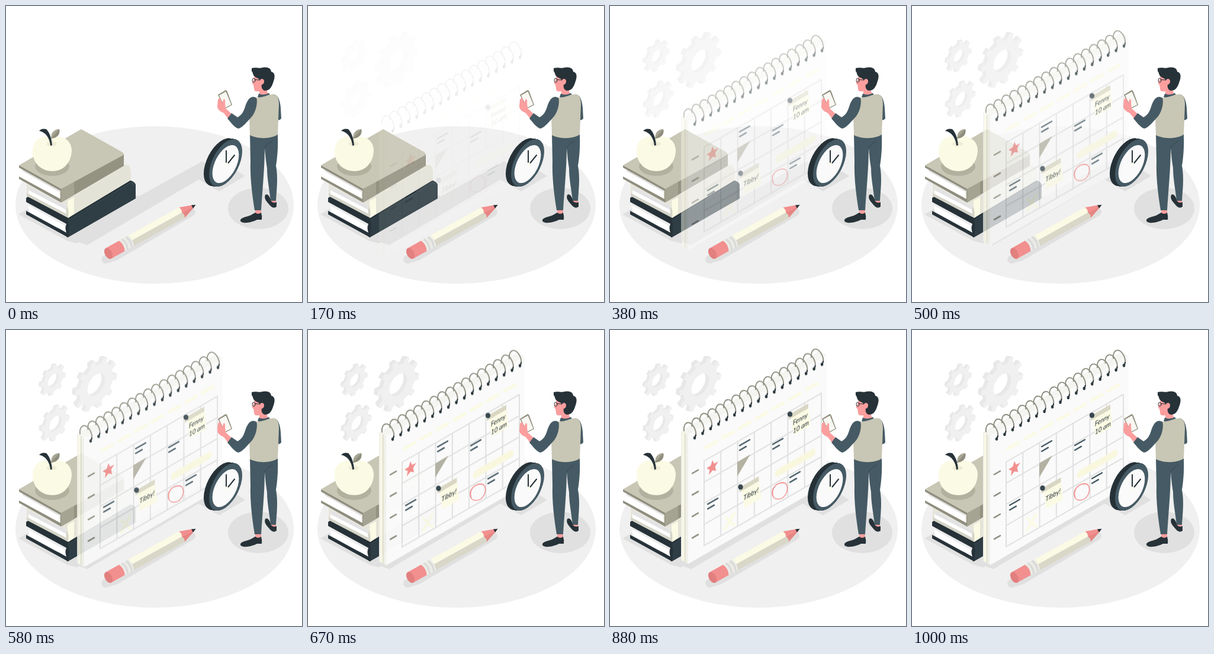
An HTML page with a canvas for the animation above (1.04 s loop, 500 by 500 pixels).

```html
<!DOCTYPE html>
<html lang="en">
<head>
<meta charset="utf-8">
<title>Planning with a calendar</title>
<style>
html, body { margin: 0; width: 100%; height: 100%; overflow: hidden; background: #fff; }
canvas { display: block; width: 500px; height: 500px; }
</style>
</head>
<body>
<canvas id="stage"></canvas>
<script>
const SIZE = 500, LOOP = 1040, STEP = 1000 / 24;
const DPR = Math.max(1, window.devicePixelRatio || 1);
const NAVY = '#263238', SLATE = '#455a64', CREAM = '#fbfae4', TAUPE = '#c8c6b4';
const PINK = '#f28f8f', SKIN = '#fb9e9e', SHADOW = '#e0e0e0';
const ISO = Math.tan(Math.PI / 6);

const stage = document.getElementById('stage');
stage.width = stage.height = SIZE * DPR;
const out = stage.getContext('2d');
let c;

function layer(draw) {
  const cv = document.createElement('canvas');
  cv.width = cv.height = SIZE * DPR;
  c = cv.getContext('2d');
  c.scale(DPR, DPR);
  c.lineCap = c.lineJoin = 'round';
  draw();
  return cv;
}

function fill(d, color) {
  c.fillStyle = color;
  c.fill(new Path2D(d));
}

function line(d, color, width) {
  c.strokeStyle = color;
  c.lineWidth = width;
  c.stroke(new Path2D(d));
}

function oval(x, y, rx, ry, color, turn = 0) {
  c.fillStyle = color;
  c.beginPath();
  c.ellipse(x, y, rx, ry, turn, 0, 7);
  c.fill();
}

// Draw in the upright plane that rises to the right
function onPlane(x, y, draw, kx = .866, ky = -.5) {
  c.save();
  c.transform(kx, ky, 0, 1, x, y);
  draw();
  c.restore();
}

function floor() {
  oval(251, 336, 235, 133, '#f0f0f0');
  fill('M21 352L90 312L221 320L232 326L120 401L104 397Z', SHADOW);
  fill('M107 391L220 324L332 262L352 278L324 294L137 404L116 396Z', SHADOW);
  fill('M325 293L358 275L380 272L404 287L360 313Z', SHADOW);
  oval(426, 342, 51, 35, SHADOW);
}

function books() {
  // bottom
  fill('M34 324L110 282L204 294Q215 294 219 301V325L104 391Z', NAVY);
  fill('M104 362L211 297Q217 297 219 303L118 361Z', '#37474f');
  fill('M104 363L211 299L219 305V325L104 391Z', '#2f3d44');
  fill('M38 332L102 367Q99 374 102 383L38 347Z', '#fff');
  fill('M38 332L102 367L101 372L38 337Z', '#ebebeb');
  fill('M34 324L104 362Q108 364 105 391L34 352V346L102 383V368L34 331Z', NAVY);
  // middle
  fill('M35 300L110 262L202 268Q210 271 211 281V294L105 357L35 321Z', '#e6e5da');
  fill('M104 329L206 268Q211 273 211 282V294L105 358Z', '#e4e3d7');
  fill('M104 329L115 323V351L105 358Z', CREAM);
  fill('M38 304L102 337Q99 345 103 354L38 319Z', '#fff');
  fill('M38 304L102 337L101 344L38 311Z', '#e3e3e3');
  fill('M35 316L102 351V339Q107 343 105 358L35 321Z', '#d5d4c8');
  // top
  fill('M93 308L199 250V270L93 332Z', '#949281');
  fill('M93 308L115 296V319L93 332Z', '#a5a392');
  fill('M28 273L92 308Q88 316 92 328L28 292Z', '#fff');
  fill('M28 273L92 308L90 314L28 279Z', '#e0e0e0');
  fill('M22 288L92 326V312L22 273V269L93 307V332L22 292Z', '#8f8d7d');
  fill('M22 269L127 208L195 246Q200 249 198 252L93 309Z', TAUPE);
}

function apple() {
  oval(78, 271, 29, 16, '#b2b09f');
  fill('M77 223C90 217 110 223 111 243C111 264 97 279 79 279C60 279 45 266 45 245C45 222 65 217 77 223Z', CREAM);
  oval(77, 233, 9, 4, '#efedd6');
  fill('M75 236C74 223 67 213 56 211Q60 206 68 208C74 214 77 224 78 235Z', NAVY);
  fill('M76 224C76 213 82 208 90 208C92 216 87 223 76 224Z', '#a7a594');
  fill('M76 224L90 208C92 216 87 223 76 224Z', '#8f8d7d');
}

function gear(x, y, r, teeth, depth) {
  const path = new Path2D();
  const edge = [[-.43, .79], [-.24, .8], [-.17, 1], [.17, 1], [.24, .8]];
  for (let i = 0; i < teeth; i++) {
    for (const [off, k] of edge) {
      const a = (i + off) / teeth * Math.PI * 2 + .15;
      path.lineTo(Math.cos(a) * r * k, Math.sin(a) * r * k);
    }
  }
  path.closePath();
  path.moveTo(r * .42, 0);
  path.arc(0, 0, r * .42, 0, 7);
  for (let d = depth; d >= 0; d -= .5) {
    c.fillStyle = d ? '#e8e8e8' : '#f0f0f0';
    onPlane(x - d, y - d * .5, () => c.fill(path, 'evenodd'));
  }
}

function gears() {
  gear(152.5, 92.5, 41, 10, 6);
  gear(80, 85, 24.5, 8, 4);
  gear(83.5, 158, 28, 8, 4);
}

// A stroke following the calendar's slope
function dash(x, y, dx, color, width) {
  line(`M${x} ${y}l${dx} ${-dx * ISO}`, color, width);
}

function note(x, y, rows) {
  fill(`M${x + 2} ${y + 4}l29 -17l4 32l-29 16Z`, CREAM);
  fill(`M${x - 2} ${y + 1}l33 -19v8l-33 19Z`, '#d9d7c3');
  oval(x, y, 4.2, 4.6, '#37474f');
  c.fillStyle = NAVY;
  c.font = 'italic 400 11.5px Lato, Inter, sans-serif';
  rows.forEach((row, i) => {
    onPlane(x + 5, y + (rows.length > 1 ? 19 : 23) + i * 14, () => c.fillText(row, 0, 0));
  });
}

function ring(x, y) {
  c.save();
  c.translate(x, y);
  oval(0, 0, 2.2, 2.8, NAVY);
  line('M-18 -12C-19 -21 -15 -27 -9 -25.5C-2 -23 6 -9 0 0', '#8f8e81', 1.9);
  line('M2 -5Q1.500 -2 0 0', NAVY, 2);
  c.restore();
}

function star(x, y, r) {
  onPlane(x, y, () => {
    c.fillStyle = PINK;
    c.beginPath();
    for (let i = 0; i < 10; i++) {
      const a = i * Math.PI / 5 - Math.PI / 2, k = i % 2 ? r * .46 : r;
      c.lineTo(Math.cos(a) * k, Math.sin(a) * k);
    }
    c.fill();
  });
}

function calendar() {
  fill('M120 172L354 37L366 44L132 179Z', '#f4f4f1');
  fill('M120 172L132 179V397L120 390Z', '#f0f0ea');
  fill('M122 173L125 175V393L122 391Z', '#f9f8e6');
  fill('M126 175.500L127.500 176.500V394.500L126 393.500Z', '#deddc5');
  fill('M132 179L366 44V262L132 397Z', '#fafafa');

  for (let i = 0; i < 7; i++) dash(162 + i * 28.3, 200.500 - i * 16.3, 18, CREAM, 5);

  const col = 198 / 7, row = 35.75;
  for (let i = 0; i < 8; i++) {
    const x = 159 + i * col;
    line(`M${x} ${223 - i * col * ISO}v${row * 4}`, SHADOW, 2);
  }
  for (let i = 0; i < 5; i++) dash(159, 223 + i * row, 198, SHADOW, 2);
  for (let i = 0; i < 4; i++) dash(139, 244 + i * 36.4, 10, '#8f8d7f', 2.5);

  fill('M215 225L237 212L215 249Z', '#b3b1a2');
  fill('M283 237L342 203Q347 200 347 206V210L343 215L284 249Q279 252 279 246V243Z', '#f9f8de');
  line('M195 318L210 332M210 311L194 339', CREAM, 4);

  for (const [x, y] of [[219, 197], [275, 195], [165, 296], [304, 251]]) {
    dash(x, y, 17, SLATE, 2.4);
    dash(x, y + 8, 11, SLATE, 2.4);
  }
  star(173, 233.5, 12);
  line('M297 261C286 257 273 266 274 278C275 291 291 290 297 279C303 267 298 257 288 260C277 263 272 273 276 284', PINK, 1.5);

  note(304, 144, ['Fenny', '10 am']);
  note(220.500, 267, ['Tibby!']);
  for (let i = 0; i < 17; i++) ring(143 + i * 13.44, 184 - i * 13.44 * ISO);
}

function clock() {
  const disc = (x, y, r, color) => onPlane(x, y, () => oval(0, 0, r, r, color), .8, -.56);
  for (let d = 9; d > 0; d -= .5) disc(371 - d, 265 - d * .15, 35, NAVY);
  disc(371, 265, 35, SLATE);
  disc(371, 267, 28, '#fafafa');
  line('M372 264V244.500M375.500 265L386 252', NAVY, 2);
  oval(373, 267, 2, 2.4, CREAM);
}

function pencil() {
  line('M168 428L185 423L313 348', SHADOW, 14);
  c.save();
  c.translate(173, 418);
  c.rotate(-.508);
  fill('M142 -10L165 -2V2L142 10Z', PINK);
  fill('M142 1L166 1L142 10Z', '#e58683');
  fill('M162 -3L169 0L162 3Z', NAVY);
  fill('M42 -10H142Q145 -5 142 0H42Z', CREAM);
  fill('M42 0H142Q145 5 142 10H42Z', '#d9d7c8');
  fill('M26 -10H44Q48 0 44 10H26Z', '#ebebe6');
  line('M32 -9Q36 0 32 9M40 -9Q44 0 40 9', '#d9d9d9', 3);
  fill('M0 -10H26Q31 0 26 10H0Z', PINK);
  oval(0, 0, 6, 10, '#e27f7f');
  c.restore();
}

function man() {
  // far arm, ankles, shoes
  fill('M450 150C458 147 463 158 464 172L465 190Q462 194 458 192L456 168Z', SLATE);
  fill('M447 326H456V335H448ZM421 342H431V353H421Z', SKIN);
  fill('M438 319C442 316 446 322 448 330Q453 334 457 331V339Q452 343 447 338C441 331 435 326 438 319Z', NAVY);
  fill('M396 361C400 356 409 356 414 353L421 349Q426 353 431 349Q433 355 432 361L424 361C418 364 409 367 401 366Q395 365 396 361Z', NAVY);
  // trousers
  fill('M434 230L459 216C460 240 458 258 456 270C460 290 457 312 456 329H447C445 310 441 292 441 274Q438 255 437 240Z', SLATE);
  fill('M412 216L459 216C452 226 440 228 437 240C437 272 433 312 431 345H420C416 320 412 290 413 262Z', SLATE);
  line('M437 240Q439 234 450 228', '#37474f', 1);
  // head
  fill('M420 117L432 118L440 140L443 150H428V144C422 145 419 144 419 139L418 133L415.500 131L418 125Z', SKIN);
  fill('M415 105C422 103 429 106 433 104C441 102 448 105 448 111C456 113 454 122 451 130C448 139 444 143 437 143C432 141 431 137 432 131L427 123L421 120C416 116 418 113 415 110Z', NAVY);
  oval(432, 128, 4, 5, SKIN, .3);
  c.beginPath();
  c.ellipse(418.5, 125.5, 2.5, 3.5, 0, 0, 7);
  c.lineWidth = 1;
  c.strokeStyle = NAVY;
  c.stroke();
  line('M421 124.500L429 125', NAVY, 1.2);
  // torso
  fill('M427 148Q435 152 444 147L447 152Q436 158 425 154Z', SLATE);
  fill('M421 155Q432 155 444 150L452 149C459 150 461 157 461 166L459 217C448 225 424 225 412 218L411 187C411 175 416 163 421 155Z', TAUPE);
  // phone and near arm
  fill('M358 150L371 142Q373 142 374 145L382 167L369 174Z', '#8f8d7d');
  fill('M360 151L371.500 144.500L380.500 166.500L370 172Z', '#f8f7f2');
  fill('M358 158Q361 154 363 157L365 164L368 157Q371 158 370 164L371 173L381 182L375 190L368 181C362 178 357 175 357 169Z', SKIN);
  fill('M423 155C414 150 408 157 404 170C401 180 397 185 391 188L381 181L374 190C380 197 386 205 392 207C398 207 408 195 416 186C424 175 425 160 423 155Z', SLATE);
}

const back = layer(() => { floor(); books(); apple(); });
const gearLayer = layer(gears);
const page = layer(calendar);
const front = layer(() => { clock(); pencil(); man(); });

// cubic-bezier(.36, -.01, .5, 1.38)
function ease(x) {
  if (x >= 1) return 1;
  const curve = (s, a, b) => 3 * (1 - s) * (1 - s) * s * a + 3 * (1 - s) * s * s * b + s * s * s;
  let lo = 0, hi = 1;
  for (let i = 0; i < 24; i++) {
    const mid = (lo + hi) / 2;
    if (curve(mid, .36, .5) < x) lo = mid; else hi = mid;
  }
  return curve(lo, -.01, 1.38);
}

function put(img, alpha = 1, dy = 0) {
  out.globalAlpha = alpha;
  out.drawImage(img, 0, dy, SIZE, SIZE);
}

function render(ms) {
  const tick = Math.min(24, Math.floor((ms + 4.5) / STEP));
  const p = tick < 3 ? 0 : ease(tick / 24);
  const alpha = Math.max(0, Math.min(1, p));
  out.setTransform(DPR, 0, 0, DPR, 0, 0);
  out.globalAlpha = 1;
  out.fillStyle = '#fff';
  out.fillRect(0, 0, SIZE, SIZE);
  put(back);
  put(gearLayer, alpha);
  put(page, alpha, 30 * (1 - p));
  put(front);
}

const start = performance.now();
function loop() {
  render((performance.now() - start) % LOOP);
  requestAnimationFrame(loop);
}
loop();
</script>
</body>
</html>
```
